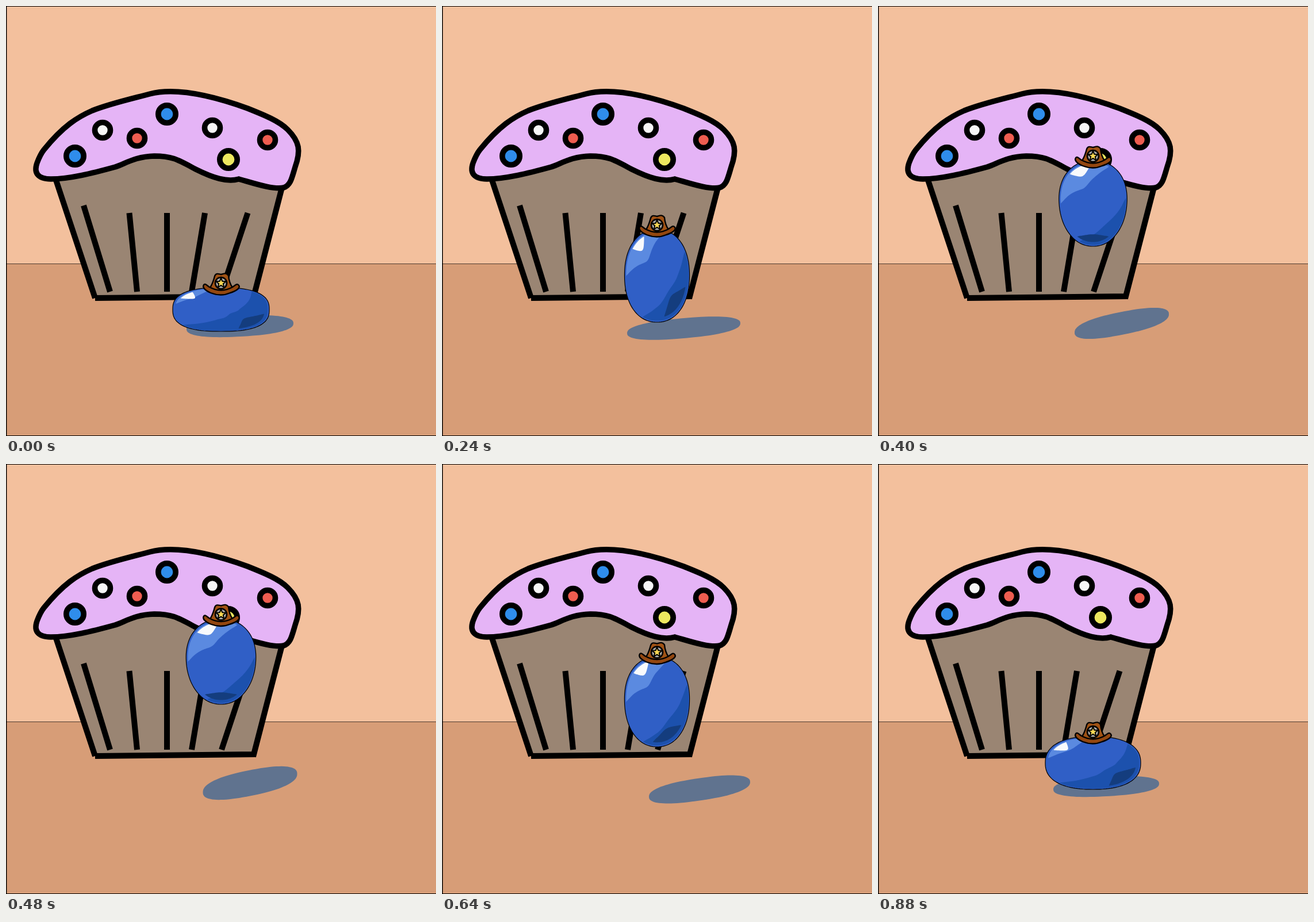
Animation of 748 by 748 pixels, one loop 960 ms. Source, as an HTML page with a canvas:

```html
<!DOCTYPE html>
<html lang="en">
<head>
<meta charset="utf-8">
<title>Bouncing blueberry</title>
<style>
html, body { margin: 0; width: 100%; height: 100%; overflow: hidden; }
canvas { display: block; }
</style>
</head>
<body>
<canvas id="stage" width="748" height="748"></canvas>
<script>
const ctx = document.getElementById('stage').getContext('2d');
const STEP = 80, STEPS = 12, FLOOR = 566, CENTER = 374, JUMP = 148;

// Key poses of the bounce; the rest of the look follows from these.
const poses = [
  { step: 0, top: 490, bottom: 566, half: 84, shadow: [407, 557, 93, 18] },
  { step: 2, top: 447, bottom: 566, half: 65, shadow: [410, 564, 87, 20] },
  { step: 4, top: 331, bottom: 534, half: 48, shadow: [431, 557, 110, 15] },
  { step: 5, top: 269, bottom: 418, half: 59, shadow: [424, 552, 82, 20] },
  { step: 7, top: 270, bottom: 418, half: 62, shadow: [425, 558, 82, 25] },
  { step: 9, top: 401, bottom: 566, half: 51, shadow: [471, 574, 94, 14] },
  { step: 11, top: 474, bottom: 566, half: 83, shadow: [397, 561, 92, 17] }
];

const mix = (a, b, k) => a + (b - a) * k;

function poseAt(step) {
  const next = Math.max(1, poses.findIndex(p => p.step >= step));
  const a = poses[next - 1], b = poses[next];
  const k = (step - a.step) / (b.step - a.step);
  const part = name => mix(a[name], b[name], k);
  return {
    top: part('top'), bottom: part('bottom'), half: part('half'),
    shadow: a.shadow.map((v, i) => mix(v, b.shadow[i], k))
  };
}

// Point on a unit superellipse; a higher power gives squarer sides.
function rim(degrees, power) {
  const a = degrees * Math.PI / 180;
  const bend = v => Math.sign(v) * Math.abs(v) ** (2 / power);
  return [bend(Math.cos(a)), bend(Math.sin(a))];
}

function polygon(points) {
  const path = new Path2D();
  for (const p of points) path.lineTo(...p);
  path.closePath();
  return path;
}

function ring(count, pointAt) {
  return polygon(Array.from({ length: count }, (_, i) => pointAt(i * 360 / count, i)));
}

// Sliver along the rim between two angles, cut back towards the middle.
function crescent(from, to, outer, depth, place) {
  const points = [], n = 40;
  for (let i = 0; i <= n; i++) points.push(place(mix(from, to, i / n), outer));
  for (let i = n; i >= 0; i--) {
    const cut = 1 - depth * Math.sin(Math.PI * i / n) ** 0.8;
    points.push(place(mix(from, to, i / n), outer * cut));
  }
  return polygon(points);
}

function draw(path, fill, width) {
  if (fill) {
    ctx.fillStyle = fill;
    ctx.fill(path);
  }
  if (width) {
    ctx.lineWidth = width;
    ctx.strokeStyle = '#000';
    ctx.stroke(path);
  }
}

function circle(x, y, r) {
  const path = new Path2D();
  path.arc(x, y, r, 0, Math.PI * 2);
  return path;
}

const cup = new Path2D('M86 300L200 262L300 250L481 312L431 505L155 508Z');
const cupLines = new Path2D('M86 300L155 508M155 508L433 505M430 509L481 312' +
  'M135 347L181 497M214.500 360L228 497M280 360V497M346 360L323 497M420.500 360L375 497');
const frosting = new Path2D('M66 250C100 208 125 193 150 182C180 170 220 161 250 153' +
  'C300 140 370 160 420 178C450 190 475 200 490 215C511 236 513 252 503 280' +
  'C497 300 495 312 483 316C465 320 430 308 405 301C385 307 360 299 330 284' +
  'C300 268 290 261 258 261C225 262 210 273 190 280C150 291 110 301 78 301' +
  'C55 301 48 290 54 273C57 265 62 255 66 250Z');
const BLUE = '#2f8deb', WHITE = '#f6f6f6', RED = '#ee5d50', YELLOW = '#ede85f';
const sprinkles = [
  [120, 261, BLUE], [168, 216, WHITE], [228, 230, RED], [280, 188, BLUE],
  [359, 212, WHITE], [387, 267, YELLOW], [455, 233, RED]
];

function drawScene() {
  const rect = (color, ...box) => {
    ctx.fillStyle = color;
    ctx.fillRect(...box);
  };
  rect('#f3c09d', 0, 0, 748, 448);
  rect('#d79d77', 0, 448, 748, 300);
  rect('#4f3c30', 0, 448, 748, 1);
  rect('#000', 0, 0, 1.4, 748);
  rect('#000', 0, 0, 748, 1);
  rect('#000', 0, 747, 748, 1);
  draw(cup, '#9a8573');
  draw(cupLines, null, 10);
  draw(frosting, '#e5b4f6', 9.5);
  for (const [x, y, color] of sprinkles) {
    const r = color === BLUE || color === YELLOW ? 15.2 : 13.5;
    draw(circle(x, y, r), color, 9.6);
  }
}

const crown = new Path2D('M-19 8Q-14 0-11-12C-9-18-4-16 0-15C4-16 9-19 13-13Q14-1 20 8Q0 18-19 8Z');
const brim = new Path2D('M-30 3C-33 8-27 13-18 17Q0 24 16 17C28 13 34 8 31 4C28 0 26 3 20 7' +
  'Q0 18-20 7C-25 4-27 0-30 3Z');
const star = ring(10, (angle, i) => rim(angle - 90, 2).map(v => v * (i % 2 ? 4 : 9)));

function drawHat(x, y) {
  ctx.save();
  ctx.translate(x, y);
  draw(crown, '#a05214', 2.4);
  draw(brim, '#934710', 2.4);
  draw(circle(0, 0, 10), '#aaa9a7', 2.6);
  draw(star, '#fbd955', 2);
  ctx.restore();
}

function drawShadow([x, y, rx, ry], lift) {
  const tilt = 5 + 11 * Math.sqrt(lift);
  draw(ring(90, angle => {
    const [u, v] = rim(angle, 2.4);
    return [x + rx * u, y + ry * v - tilt * u];
  }), '#60738f');
}

function drawBerry({ top, bottom, half, shadow }) {
  const middle = (top + bottom) / 2, tall = (bottom - top) / 2;
  const stretch = Math.log(tall / half), strain = Math.abs(stretch);
  const lift = Math.max(0, FLOOR - bottom) / JUMP;
  const power = 2.1 + 0.8 * stretch ** 2;

  // Airborne, the berry narrows slightly towards its base.
  const place = (angle, r) => {
    const [u, v] = rim(angle, power);
    return [CENTER + half * r * u * (1 - 0.08 * lift * v), middle + tall * r * v];
  };
  const arc = (color, center, spread, outer, depth) =>
    draw(crescent(center - spread, center + spread, outer, depth, place), color);

  drawShadow(shadow, lift);
  const body = ring(120, angle => place(angle, 1));
  draw(body, '#305fc6');
  const shadeFrom = -15 - 50 * strain + 20 * lift;
  const shadeTo = 115 + 30 * Math.max(0, -stretch);
  draw(crescent(shadeFrom, shadeTo, 0.97, 0.35 + 0.5 * strain - 0.1 * lift, place), '#1c51ad');
  arc('#143d7e', 40 + 50 * lift, 32, 0.9, 0.35 - 0.15 * lift);
  const squash = Math.min(0, stretch);
  arc('#5b8ae0', 228 + 10 * lift, 48 + 14 * squash + 10 * lift, 0.95, 0.55 + 0.4 * squash);
  arc('#f8fafc', 222 + 22 * Math.max(0, stretch) + 20 * lift, 14 + 6 * lift, 0.92, 0.25);
  draw(body, null, 1.2);
  drawHat(CENTER, top - 8);
}

function frame() {
  drawScene();
  drawBerry(poseAt(Math.floor(performance.now() / STEP) % STEPS));
  requestAnimationFrame(frame);
}
frame();
</script>
</body>
</html>
```
